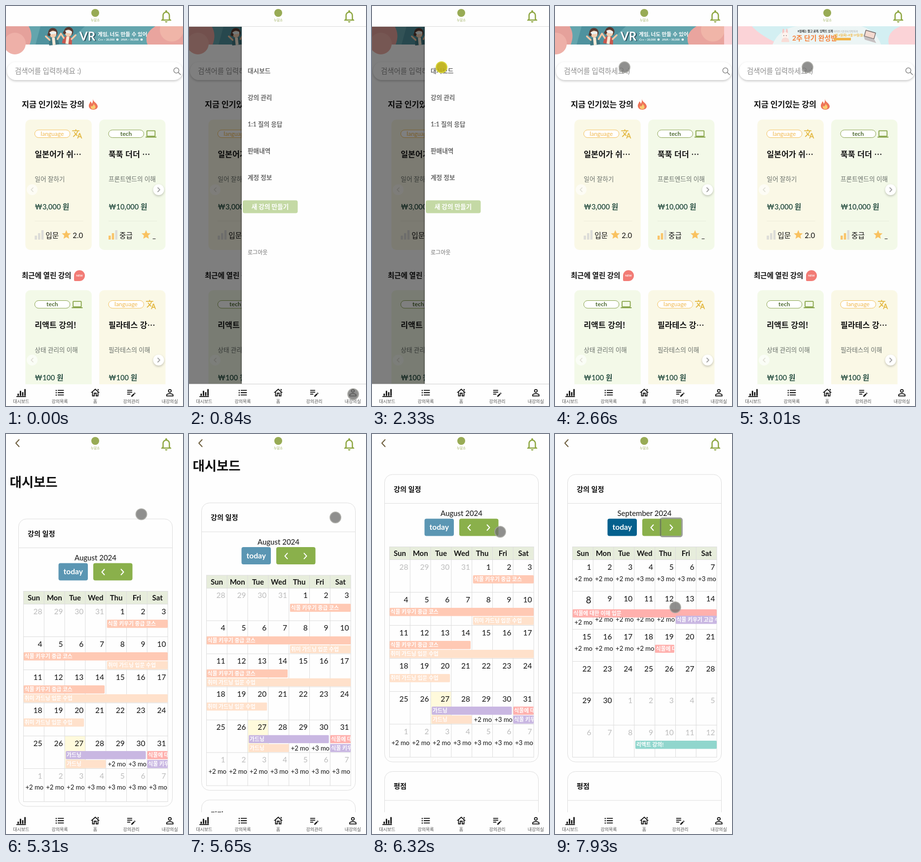
Animation of 359 by 810 pixels, one loop 8 s. Source, as an HTML page:

```html
<!DOCTYPE html>
<html lang="ko">
<head>
<meta charset="utf-8">
<title>강의 대시보드</title>
<style>
html, body { margin: 0; width: 100%; height: 100%; overflow: hidden; background: #fefefe; }
svg { display: block; }
#stage { width: 100vw; height: 100vh; }
text { font-family: Lato, "Noto Sans CJK KR", "Noto Sans CJK JP", sans-serif; white-space: pre; }
.ko { font-family: "Noto Sans CJK KR", "Noto Sans CJK JP", sans-serif; }
.lift { filter: drop-shadow(0 2px 2px rgba(0,0,0,.22)); }
</style>
</head>
<body>
<svg id="stage" viewBox="0 0 359 810"></svg>
<script>
const ICON = {
  translate: 'M12.87 15.07l-2.54-2.51.03-.03c1.74-1.94 2.98-4.17 3.71-6.53H17V4h-7V2H8v2H1v1.99h11.17C11.5 7.92 10.44 9.75 9 11.35 8.07 10.32 7.3 9.19 6.69 8h-2c.73 1.63 1.73 3.17 2.98 4.56l-5.09 5.02L4 19l5-5 3.11 3.11.76-2.04zM18.5 10h-2L12 22h2l1.12-3h4.75L21 22h2l-4.5-12zm-2.62 7l1.62-4.33L19.12 17h-3.24z',
  laptop: 'M20 18c1.1 0 2-.9 2-2V6c0-1.1-.9-2-2-2H4c-1.1 0-2 .9-2 2v10c0 1.1.9 2 2 2H0v2h24v-2h-4zM4 6h16v10H4V6z',
  star: 'M12 17.27 18.18 21l-1.64-7.03L22 9.24l-7.19-.61L12 2 9.19 8.63 2 9.24l5.46 4.73L5.82 21z',
  bell: 'M12 22c1.1 0 2-.9 2-2h-4c0 1.1.89 2 2 2zm6-6v-5c0-3.07-1.63-5.64-4.5-6.32V4c0-.83-.67-1.5-1.5-1.5s-1.5.67-1.5 1.5v.68C7.64 5.36 6 7.92 6 11v5l-2 2v1h16v-1l-2-2zm-2 1H8v-6c0-2.48 1.51-4.5 4-4.5s4 2.02 4 4.5v6z',
  chart: 'M1.5 19.5h21v2h-21zM4 14h3v5H4zM9 8h3v11H9zM14 11h3v8h-3zM19 4h3v15h-3z',
  list: 'M3 6h2.4v2.4H3zM3 11h2.4v2.4H3zM3 16h2.4v2.4H3zM7.5 6H21v2H7.5zM7.5 11H21v2H7.5zM7.5 16H21v2H7.5z',
  home: 'M12 5.69l5 4.5V18h-2v-6H9v6H7v-7.81l5-4.5M12 3 2 12h3v8h6v-6h2v6h6v-8h3L12 3zM17 4h2.5v4L17 6z',
  note: 'M3 10h11v2H3v-2zm0-2h11V6H3v2zm0 8h7v-2H3v2zm15.01-3.13.71-.71c.39-.39 1.02-.39 1.41 0l.71.71c.39.39.39 1.02 0 1.41l-.71.71-2.12-2.12zm-.71.71-5.3 5.3V21h2.12l5.3-5.3-2.12-2.12z',
  person: 'M12 5.9a2.1 2.1 0 1 1 0 4.2 2.1 2.1 0 0 1 0-4.2m0 9c2.97 0 6.1 1.46 6.1 2.1v1.1H5.9V17c0-.64 3.13-2.1 6.1-2.1M12 4a4 4 0 1 0 0 8 4 4 0 0 0 0-8zm0 9c-2.67 0-8 1.34-8 4v3h16v-3c0-2.66-5.33-4-8-4z'
};

const text = (x, y, size, str, fill = '#111', weight = 400, more = '') =>
  `<text x="${x}" y="${y}" font-size="${size}" fill="${fill}" font-weight="${weight}" ${more}>${str}</text>`;
const rect = (x, y, w, h, fill, r = 0, more = '') =>
  `<rect x="${x}" y="${y}" width="${w}" height="${h}" fill="${fill}" rx="${r}" ${more}/>`;
const circle = (x, y, r, fill, more = '') => `<circle cx="${x}" cy="${y}" r="${r}" fill="${fill}" ${more}/>`;
const path = (d, fill, more = '') => `<path d="${d}" fill="${fill}" ${more}/>`;
const line = (d, color, width = 1) =>
  path(d, 'none', `stroke="${color}" stroke-width="${width}" stroke-linecap="round" stroke-linejoin="round"`);
const icon = (name, x, y, scale, fill) => path(ICON[name], fill, `transform="translate(${x} ${y}) scale(${scale})" fill-rule="evenodd"`);
const group = (id, body, more = '') => `<g id="${id}" ${more}>${body}</g>`;
const MIDDLE = 'text-anchor="middle"', END = 'text-anchor="end"';

// ---- home ----
function kid(x, y, shirt, tilt) {
  return `<g transform="translate(${x} ${y}) rotate(${tilt})">`
    + path('M-10 25Q-10 9 0 9T10 25z', shirt) + rect(-3, 10, 6, 15, '#f6ead8')
    + line('M-8 14L-15 6M8 14L15 5', '#f2c6a4', 3.5)
    + circle(0, 0, 9.5, '#593a31') + circle(0, 3, 7, '#f4cfb2') + rect(-7, -2, 14, 5, '#e9f1f2', 2)
    + circle(-8, 3, 3, '#593a31') + '</g>';
}

const gameBanner = rect(0, 41, 359, 37, '#64a5ad')
  + path('M70 41H160L120 78H60z', '#4f929e') + path('M0 41H46Q56 58 48 78H0z', '#e5a19b')
  + circle(18, 76, 22, '#eeb0a8') + path('M359 41H303Q278 56 287 78H359z', '#e9a49e') + circle(336, 48, 24, '#f0b5a8')
  + kid(95, 54, '#3f7782', -6) + kid(127, 52, '#c8574d', 8)
  + text(151, 71, 24, 'VR', '#28505c', 700) + text(149, 70, 24, 'VR', '#fff', 700)
  + text(186, 61, 10.6, '게임, 너도 만들 수 있어', '#fff', 700)
  + text(187, 70, 5.5, 'C++ ~ 20,000', '#fff', 700) + circle(226, 68, 2.3, '#fff')
  + text(233, 70, 5.5, 'JAVA ~ 30,000', '#fff', 700) + circle(275, 68, 2.3, '#fff');

const summerBanner = rect(0, 41, 359, 37, '#d3eff2')
  + path('M0 41H28Q48 62 86 78H0z', '#fbd3d7') + path('M359 41H330Q300 52 306 78H359z', '#fbd3d7')
  + path('M70 78Q84 45 120 41H250Q280 50 290 78z', '#ecf5f5')
  + '<ellipse cx="92" cy="52" rx="2.2" ry="6" fill="#f7c9c6"/><ellipse cx="99" cy="52" rx="2.2" ry="6" fill="#f7c9c6"/>'
  + circle(96, 60, 7, '#fff3ee') + path('M88 73Q88 64 96 64T104 73z', '#f9dcd6') + circle(93, 60, .8, '#444') + circle(98, 60, .8, '#444')
  + text(121, 53, 5.6, '8월에는 짧고 굵게, 임팩트 있게', '#333', 700)
  + text(110, 70, 13.8, '2주 단기 완성반', '#f4803a', 700)
  + text(194, 53, 4.6, '파이썬 기초부터 탄탄하게', '#a0a0a0')
  + text(194, 61, 5.7, '8월 6일(화)~8월 19일(월)', '#eeb33a', 700) + rect(194, 64.5, 35, 5, '#f2b041')
  + '<g transform="rotate(16 268 60)">' + rect(256, 51, 22, 14, '#78706f', 1) + rect(257.5, 52.5, 19, 11, '#f3d9cf')
  + path('M256 65H278L284 71H260z', '#c5bfc0') + '</g>';

function card(x, y, { kind, title, about, price, level, bars, score, scoreX }) {
  const tech = kind === 'tech';
  const edge = tech ? '#8aa350' : '#f3c15c';
  let out = rect(x, y, 134.5, 264, tech ? '#f3f9e8' : '#faf8e6', 10)
    + rect(x + 19, y + 21, 71.5, 15.5, '#fff', 7.8, `stroke="${edge}"`)
    + text(x + 54.5, y + 32.5, 12, kind, tech ? '#4f6b33' : '#f0b74a', tech ? 700 : 400, MIDDLE)
    + icon(tech ? 'laptop' : 'translate', x + 94, y + 18, .92, tech ? '#8aa64e' : '#e3b842')
    + text(x + 19, y + 76, 16.1, title, '#151515', 700, 'class="ko"')
    + text(x + 19, y + 125, 12.6, about, '#69706a')
    + text(x + 19, y + 182, 14.6, price, '#254d40', 600)
    + rect(x + 19, y + 205, 98, 1, tech ? '#e6ecdb' : '#edebd9');
  [8, 13, 19].forEach((h, i) => out += rect(x + 19 + i * 6.7, y + 243 - h, 4.5, h, i < bars ? '#f9c46a' : '#dcdcd8'));
  return out + text(x + 41, y + 240, 14.6, level) + icon('star', x + scoreX, y + 222, .92, '#f9c260')
    + text(x + scoreX + 24, y + 240, 15, score);
}

function arrows(y) {
  return circle(53, y, 11, '#fff', 'opacity=".6"') + line(`M55 ${y - 4}L51 ${y}L55 ${y + 4}`, '#dedcd2', 1.6)
    + circle(309.5, y, 11, '#fff', 'class="lift"') + line(`M308 ${y - 4}L312 ${y}L308 ${y + 4}`, '#a3a3a3', 1.8);
}

const language = { kind: 'language', level: '입문', bars: 0, score: '2.0', scoreX: 72 };
const tech = { kind: 'tech', level: '중급', bars: 2, score: '_', scoreX: 84 };
const home = rect(0, 41, 359, 769, '#fefefe')
  + `<g id="banners">${gameBanner}<g transform="translate(359 0)">${summerBanner}</g></g>`
  + rect(2, 113.5, 356.5, 36.5, '#fff', 18, 'class="lift"')
  + text(18, 137, 14.4, '검색어를 입력하세요 :)', '#8d8d8d', 500)
  + circle(345.5, 130.5, 5.2, 'none', 'stroke="#888" stroke-width="1.5"') + line('M349.5 134.5L354 139', '#888', 1.7)
  + text(32, 205, 16.2, '지금 인기있는 강의', '#111', 700)
  + path('M176 188C177 195 185 196 186 203C186 208 181 210 177 210C171 210 168 206 168 202C168 198 171 196 171 193Q174 195 174 198Q177 194 176 188z', '#ee7358')
  + path('M178 196Q178 200 181 202Q183 209 177 209T172 202Q174 204 175 203Q178 201 178 196z', '#f9cb70')
  + card(39.3, 230, { ...language, title: '일본어가 쉬…', about: '일어 잘하기', price: '₩3,000 원' })
  + card(189, 230, { ...tech, title: '푹푹 더더 …', about: '프론트엔드의 이해', price: '₩10,000 원' })
  + arrows(372)
  + text(32, 550.5, 14.5, '최근에 열린 강의', '#111', 700)
  + circle(149, 546, 11, '#f27b75') + rect(138, 546, 11, 11, '#f27b75', 2) + text(149, 548, 5.6, 'NEW', '#fff', 700, MIDDLE)
  + card(39.3, 575.5, { ...tech, title: '리액트 강의!', about: '상태 관리의 이해', price: '₩100 원' })
  + card(189, 575.5, { ...language, title: '필라테스 강…', about: '필라테스의 이해', price: '₩100 원' })
  + arrows(717);

const menu = ['대시보드', '강의 관리', '1:1 질의 응답', '판매내역', '계정 정보'];
const drawer = rect(107, 41, 252, 725, '#fefefe', 0, 'style="filter:drop-shadow(-1px 0 1.5px rgba(0,0,0,.4))"')
  + menu.map((label, i) => text(119, 136 + 54 * i, 12.6, label, '#6c6c6c', 700)).join('')
  + rect(109, 393.5, 111.5, 26, '#c4d9a5', 4) + text(164.5, 411, 12.6, '새 강의 만들기', '#fff', 700, MIDDLE)
  + text(119, 503, 11, '로그아웃', '#6c6c6c');

// ---- dashboard ----
const LEFT = 35.5, COL = 41.8, WEEK = ['Sun', 'Mon', 'Tue', 'Wed', 'Thu', 'Fri', 'Sat'];
const colX = i => LEFT + COL * i;
const more = (col, y, n) => text(colX(col) + 4, y, 13, `+${n} mo`);

function bar(from, to, y, color, label, starts = true, ends = true) {
  const x = colX(from) + (starts ? 2 : 0), w = colX(to) - (ends ? 2.5 : 0) - x;
  return `<svg x="${x}" y="${y}" width="${w}" height="16.7">` + rect(0, 0, w, 16.7, color, 2)
    + text(2, 12, 10.8, label, '#fff', 700) + '</svg>';
}

function month(title, lead, days, tops, special = -1) {
  let out = text(181.5, 256, 15, title, '#111', 400, MIDDLE) + rect(LEFT, 318.5, 292.5, 26.5, '#e7eddc');
  if (special === 30) out += rect(colX(2), tops[4], COL, tops[5] - tops[4], '#fffadc');
  for (let i = 0; i < 42; i++) {
    const n = i - lead + 1, outside = n < 1 || n > days;
    const day = n < 1 ? n + 31 : n > days ? n - days : n;
    const big = i === 7 && special === 7;
    out += text(colX(i % 7 + 1) - 3.7, tops[i / 7 | 0] + (big ? 24 : 20), big ? 18.5 : 15.5, day, outside ? '#bcbcbc' : '#111', 400, END);
  }
  WEEK.forEach((d, i) => out += text(colX(i + .5), 337, 15, d, '#151515', 700, MIDDLE));
  let grid = `M${LEFT} 318.5H328`;
  tops.forEach(y => grid += `M${LEFT} ${y}H328`);
  for (let i = 0; i < 8; i++) grid += `M${colX(i)} 318.5V744.5`;
  return out + line(grid, '#dddddd');
}

const PLANT = '#ffc9b4', HOBBY = '#ffe1cb', GARDEN = '#c9b7e2', BASIC = '#ffb0ad', REACT = '#90d6cd';
const course = '식물 키우기 중급 코스', hobby = '취미 가드닝 입문 수업';
const augTops = [344.5, 410.5, 477.5, 544.5, 611.5, 677.5, 744.5];
const sepTops = [344.5, 408.5, 485.5, 550.5, 614.5, 679.5, 744.5];

const augEvents = bar(4, 7, 376, PLANT, course, true, false)
  + bar(0, 7, 442, PLANT, course, false, false) + bar(4, 7, 460, HOBBY, hobby, true, false)
  + bar(0, 4, 509, PLANT, course, false) + bar(0, 7, 527, HOBBY, hobby, false, false)
  + bar(0, 3, 576, HOBBY, hobby, false)
  + bar(2, 6, 642, GARDEN, '가드닝') + bar(6, 7, 642, BASIC, '식물에 대한', false, false)
  + bar(2, 4, 660, HOBBY, '가드닝', true, false) + bar(6, 7, 660, GARDEN, '식물 키우기', false, false)
  + more(4, 673, 2) + more(5, 673, 3)
  + WEEK.map((_, i) => more(i, 720, i < 3 ? 2 : 3)).join('');

const sepEvents = WEEK.map((_, i) => more(i, 388, i < 3 ? 2 : 3)).join('')
  + more(0, 476, 2) + [1, 2, 3, 4].map(i => more(i, 470, 2)).join('')
  + bar(0, 7, 445, BASIC, '식물에 대한 이해 입문', false, false) + bar(5, 7, 458, GARDEN, '식물 키우기 고급 수업', false, false)
  + [0, 1, 2, 3].map(i => more(i, 529, 2)).join('') + bar(4, 5, 516.5, BASIC, '식물에 대한', false)
  + bar(3, 7, 711, REACT, '리액트 강의!', true, false);

const panel = (y, h, title) => rect(25.5, y, 312, h, '#fefefe', 16, 'stroke="#dedede"')
  + text(44, y + 34.5, 14.2, title, '#111', 700) + line(`M26 ${y + 58.5}H337`, '#dedede');

const dashboard = rect(0, 41, 359, 900, '#fefefe') + text(7.5, 106.5, 26.4, '대시보드', '#111', 700)
  + panel(172, 582, '강의 일정') + panel(773.5, 300, '평점')
  + group('august', month('August 2024', 4, 31, augTops, 30) + group('augEvents', augEvents))
  + group('september', month('September 2024', 0, 30, sepTops, 7) + sepEvents)
  + `<rect id="today" x="106.5" y="261.5" width="59.5" height="35" rx="4"/>` + text(136.3, 284, 15.6, 'today', '#fff', 700, MIDDLE)
  + rect(177, 261.5, 79.5, 35, '#8ab04b', 4)
  + group('focus', rect(214, 260.5, 43.5, 37, '#8ab04b', 4, 'stroke="#9da09a" stroke-width="3"') + rect(212.8, 262, 2.6, 34, '#6c8050'))
  + line('M199.5 274L194.5 279.5L199.5 285M233.5 274L238.5 279.5L233.5 285', '#fff', 2);

// ---- chrome ----
const header = rect(0, 0, 359, 41, '#fefefe') + circle(181, 14, 8, '#98ab55')
  + text(181, 31, 6.6, '누담소', '#98ab55', 400, MIDDLE) + icon('bell', 309.6, 5.4, 1.28, '#90a845');
const tabs = [['chart', '대시보드', 30.7], ['list', '강의목록', 109], ['home', '홈', 181], ['note', '강의관리', 254], ['person', '내강의실', 332.3]];
const nav = rect(0, 766, 359, 44, '#fefefe')
  + tabs.map(([name, label, x]) => icon(name, x - 11, 772, .92, '#111') + text(x, 803.5, 9, label, '#555', 400, MIDDLE)).join('');

const stage = document.getElementById('stage');
stage.innerHTML = group('home', home)
  + group('overlay', rect(0, 41, 359, 725, '#000', 0, 'id="shade"') + group('drawer', drawer))
  + group('dashboard', group('scroller', dashboard))
  + header + nav
  + group('edges', line('M0 41.5H359', '#dcdcdc') + line('M0 765.5H359', '#cfcfcf'))
  + group('back', line('M26.5 11.5L20 18.5L26.5 25.5', '#6f6040', 2))
  + group('cursor', circle(0, 0, 11, '#666', 'id="dot" stroke-width="2"'));
const el = Object.fromEntries([...stage.querySelectorAll('[id]')].map(n => [n.id, n]));

// ---- motion ----
const clamp = v => Math.min(1, Math.max(0, v));
const easeOut = p => 1 - (1 - p) ** 3;
const easeInOut = p => p * p * (3 - 2 * p);
const span = (t, a, b) => clamp((t - a) / (b - a));
const show = (node, on) => node.setAttribute('display', on ? 'inline' : 'none');
const move = (node, x, y) => node.setAttribute('transform', `translate(${x} ${y})`);

const pointer = [[430, 333, 786], [1170, 333, 786], [1400, 290, 590], [1500, 262, 480], [1620, 220, 350], [1700, 200, 300],
  [1990, 146, 166], [2060, 141, 124], [4920, 141, 124], [5150, 222, 147], [5380, 297, 169], [5990, 297, 169], [6320, 260, 198],
  [6450, 260, 198], [6790, 247, 190], [7509, 247, 190], [7510, 242, 190.5], [7650, 242, 190.5], [7790, 238, 262], [7930, 244, 351]];
const scroll = [[5555, 0], [5650, 32], [5740, 72], [5840, 90]];

function track(keys, t) {
  const i = keys.findIndex(k => k[0] > t);
  if (i < 0) return keys[keys.length - 1].slice(1);
  if (i === 0) return keys[0].slice(1);
  const a = keys[i - 1], b = keys[i], p = span(t, a[0], b[0]);
  return a.slice(1).map((v, j) => v + (b[j + 1] - v) * p);
}

function render(t) {
  const onDashboard = t >= 4170, open = t >= 500 && t < 2390, next = t >= 6920;
  const slide = easeOut(span(t, 540, 840));
  show(el.home, !onDashboard);
  show(el.dashboard, onDashboard);
  show(el.back, onDashboard);
  show(el.overlay, open);
  show(el.edges, open);
  move(el.drawer, 252 * (1 - slide), 0);
  el.shade.setAttribute('opacity', .5 * slide);
  move(el.banners, -359 * easeInOut(span(t, 2610, 3010)), 0);

  move(el.scroller, 0, -track(scroll, t)[0]);
  show(el.august, !next);
  show(el.augEvents, t >= 4240);
  show(el.september, next);
  show(el.focus, next);
  el.today.setAttribute('fill', next ? '#04608d' : '#5b96b3');

  const pressed = t < 700 || (t >= 2200 && t < 2390) || (t >= 6790 && t < 7050);
  show(el.cursor, t >= 430);
  move(el.cursor, ...track(pointer, t));
  el.dot.setAttribute('fill', pressed ? 'rgba(190,176,22,.92)' : 'rgba(112,112,110,.78)');
  el.dot.setAttribute('stroke', pressed ? 'rgba(216,213,58,.95)' : 'rgba(165,165,160,.75)');
}

const start = performance.now();
function tick() {
  render((performance.now() - start) % 8000);
  requestAnimationFrame(tick);
}
tick();
</script>
</body>
</html>
```
